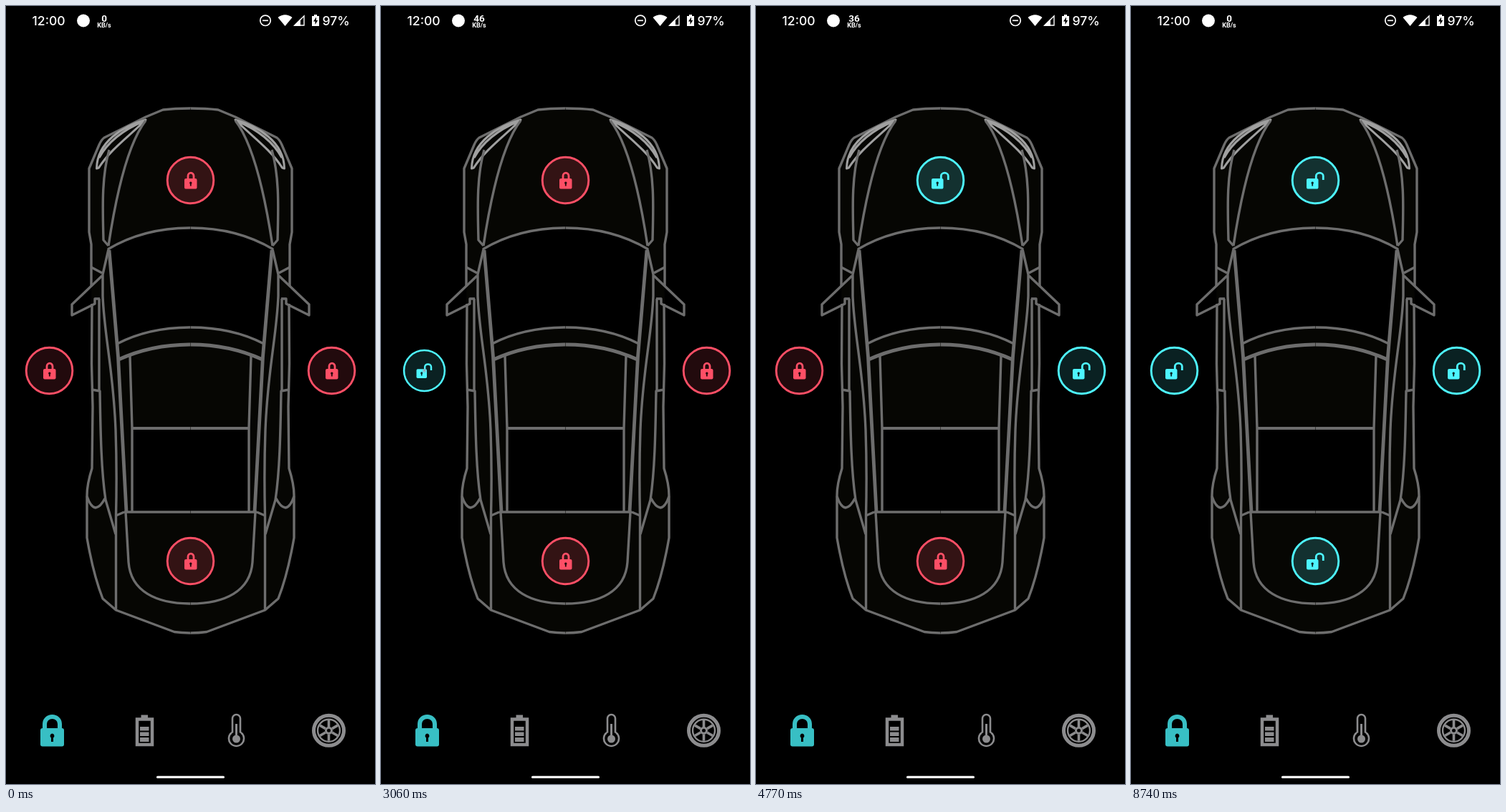
An HTML page for the animation above (9.72 s loop, 515 px wide and 1087 px high).

```html
<!DOCTYPE html>
<html lang="en">
<head>
<meta charset="utf-8">
<title>Car locks</title>
<style>
html, body { margin: 0; width: 100%; height: 100%; overflow: hidden; background: #000; }
svg { display: block; width: 515px; height: 1087px; }
text { fill: #fff; }
.time { font: 500 17.6px Inter, sans-serif; }
.speed { font: 700 13.5px Roboto, sans-serif; text-anchor: middle; }
.unit { font-size: 9px; }
.line { fill: none; stroke: #6d6d6d; stroke-width: 3.4; stroke-linejoin: round; }
.lamp { stroke: #a0a0a0; stroke-width: 3; }
.thick { stroke-width: 4.8; }
.red { color: #ff4f66; }
.cyan { color: #4df5ff; }
.icon { fill: none; stroke: #8c8c8e; }
</style>
</head>
<body>
<svg viewBox="0 0 515 1087">
  <defs>
    <g id="half" class="line">
      <g stroke="none">
        <path fill="#060603" d="M258 143L219 145L137 184L116 227V316L119 333L120 646L113 684V743L135 828L153.500 844L235 874.500L258 876Z"/>
        <path fill="#000" d="M258 310Q192 310 142 340L155 472Q199 449 258 449ZM176 590H258V707H176Z"/>
      </g>
      <path d="M257.500 143Q236 143 219 145L195 155L137 184Q133 187 130 194L116 227V316L119 333V392M120 416L119.500 500L121 560L120 646Q113 668 113 684V743Q122 795 135 828L153.500 844L235 874.500Q246 876 257.500 876"/>
      <path class="lamp" d="M195 159C163 168 127 190 126.500 227L129.500 226C146 200 172 182 195 159ZM192 161C166 172 143 188 130 212"/>
      <path d="M195 160C168 195 152 275 143 335M144 201C133 240 135 285 136 327L143 335"/>
      <path d="M143 340L135 375V405C137 460 150 510 153 592Q155 650 153.500 712V844"/>
      <path d="M142 340Q192 310 257.500 310M155 472Q199 449 257.500 449"/>
      <path class="thick" d="M144 341L156.500 490L168 707M157 494Q203 473 257.500 473"/>
      <path d="M173 489L176 590V707M165 707H257.500M153.500 712L165 707M167 707L171 777C174 818 210 835 257.500 835"/>
      <path d="M175 590H257.500" style="stroke-width:4.200"/>
      <path d="M119 365L134 373M134 377L92 417V432L124 416V409H131M130 409V537M120 536L131 538C132 600 133 650 139 690L153 738M113 685Q118 700 125 701Q132 700 138 688"/>
    </g>
    <g id="locked">
      <path d="M-3.500 -2V-6A4 4.300 0 0 1 4.500 -6V-2" fill="none" stroke="currentColor" stroke-width="2.800"/>
      <rect x="-8.500" y="-2.500" width="17.500" height="14.500" rx="2" fill="currentColor"/>
      <path d="M.3 2A1.800 1.800 0 0 1 1.200 5.300V8H-.6V5.300A1.800 1.800 0 0 1 .3 2" fill="#24090d"/>
    </g>
    <g id="unlocked">
      <path d="M.8 -2V-6A5 4.300 0 0 1 10.800 -6V-.5" fill="none" stroke="currentColor" stroke-width="2.800"/>
      <rect x="-12.500" y="-2.500" width="16.500" height="14.500" rx="2" fill="currentColor"/>
      <path d="M-4.300 2A1.800 1.800 0 0 1 -3.400 5.300V8H-5.200V5.300A1.800 1.800 0 0 1 -4.300 2" fill="#0b2525"/>
    </g>
  </defs>

  <text class="time" x="36.500" y="27">12:00</text>
  <circle cx="108" cy="20.500" r="9" fill="#fff"/>
  <text class="speed" x="137" y="21.500" id="speed">0</text>
  <text class="speed unit" x="137" y="30">KB/s</text>
  <g fill="none" stroke="#fff" stroke-width="1.700">
    <circle cx="362" cy="20.300" r="7.200"/><path d="M358 20.300H366"/>
    <path d="M403 27L416 14V27Z" stroke-width="1.400"/>
  </g>
  <path fill="#fff" d="M379.500 16Q389.500 8.500 399.500 16L389.500 28ZM401 28L411 18V28ZM427 14H430V12H434V14H437V28H427Z"/>
  <path d="M433 15.500L429 21.500H431.500V26L435.200 20H433Z"/>
  <text class="time" x="441.500" y="27">97%</text>

  <use href="#half"/>
  <use href="#half" transform="matrix(-1 0 0 1 515 0)"/>
  <g id="badges"></g>

  <g fill="#38bfc4">
    <rect x="48" y="1009" width="33" height="25.500" rx="3"/>
    <path d="M54 1010V1003A10.500 10 0 0 1 75 1003V1010" fill="none" stroke="#38bfc4" stroke-width="6"/>
    <path fill="#000" d="M64.500 1016.500A3.300 3.300 0 0 1 66 1022.500V1028H63V1022.500A3.300 3.300 0 0 1 64.500 1016.500"/>
  </g>
  <g class="icon">
    <rect x="183" y="996.500" width="21" height="35.500" stroke-width="4.500"/>
    <path fill="#8c8c8e" stroke="none" d="M188.500 990.500H198V995H188.500ZM187 1007H199.500V1012.500H187ZM187 1014.500H199.500V1020H187ZM187 1022H199.500V1028H187Z"/>
    <path d="M316 1014.500V995.500A5.500 5.500 0 0 1 327 995.500V1014.500A10.500 10.500 0 1 1 316 1014.500Z" stroke-width="2.600"/>
    <path d="M321.500 1003V1024" stroke-width="3"/>
    <circle cx="321.500" cy="1024" r="5.500" fill="#8c8c8e" stroke="none"/>
    <circle cx="450.500" cy="1012.300" r="21" stroke-width="5"/>
    <circle cx="450.500" cy="1012.300" r="15.500" stroke-width="2.400"/>
    <circle cx="450.500" cy="1012.300" r="4" stroke-width="3"/>
    <g id="spokes" stroke-width="3.600"></g>
  </g>
  <rect x="210" y="1075.800" width="95" height="3.200" rx="1.600" fill="#fff"/>
</svg>
<script>
const LOOP = 9720, SWITCH = 300;
const $ = id => document.getElementById(id);

// Each lock: centre, fill opacity, times at which it is toggled
const locks = [
  { x: 257.5, y: 243.5, fill: .18, taps: [3690] },
  { x: 60.5, y: 509.5, fill: .135, taps: [2410, 3025, 6075] },
  { x: 454.5, y: 509.5, fill: .135, taps: [4425] },
  { x: 257.5, y: 775.5, fill: .18, taps: [5165] }
];
const speeds = [[0, 0], [2600, 46], [4660, 36], [5690, 51], [6720, 38], [7760, 0]];

const badge = (open, fill) => `<g class="${open ? 'cyan' : 'red'}">
  <circle r="32.3" fill="currentColor" fill-opacity="${fill}" stroke="currentColor" stroke-width="2.9"/>
  <use href="#${open ? 'unlocked' : 'locked'}"/></g>`;

$('badges').innerHTML = locks.map(l =>
  `<g transform="translate(${l.x} ${l.y})">${badge(false, l.fill)}${badge(true, l.fill)}</g>`).join('');
locks.forEach((l, i) => {
  l.group = $('badges').children[i];
  l.faces = [...l.group.children];
});

$('spokes').innerHTML = Array.from({ length: 6 }, (_, i) =>
  `<path d="M450.5 1007V998" transform="rotate(${i * 60} 450.5 1012.3)"/>`).join('');

const bezier = (a, b, s) => 3 * a * s * (1 - s) ** 2 + 3 * b * s * s * (1 - s) + s ** 3;

function easeInOutBack(t) {
  if (t >= 1) return 1;
  let lo = 0, hi = 1;
  for (let i = 0; i < 20; i++) {
    const mid = (lo + hi) / 2;
    if (bezier(.68, .265, mid) < t) lo = mid; else hi = mid;
  }
  return bezier(-.55, 1.55, lo);
}

function drawLock(lock, time) {
  const past = lock.taps.filter(t => t <= time);
  const open = past.length % 2;
  const p = past.length ? Math.min(1, (time - past.at(-1)) / SWITCH) : 1;
  const next = lock.faces[open], prev = lock.faces[1 - open];
  // The incoming face lies on top
  if (lock.group.lastElementChild !== next) lock.group.append(next);
  next.setAttribute('transform', `scale(${easeInOutBack(p)})`);
  prev.setAttribute('transform', `scale(${1 - p})`);
  prev.style.display = p < 1 ? '' : 'none';
  next.style.display = '';
}

function frame() {
  const time = performance.now() % LOOP;
  locks.forEach(l => drawLock(l, time));
  $('speed').textContent = speeds.findLast(s => s[0] <= time)[1];
  requestAnimationFrame(frame);
}
frame();
</script>
</body>
</html>
```
